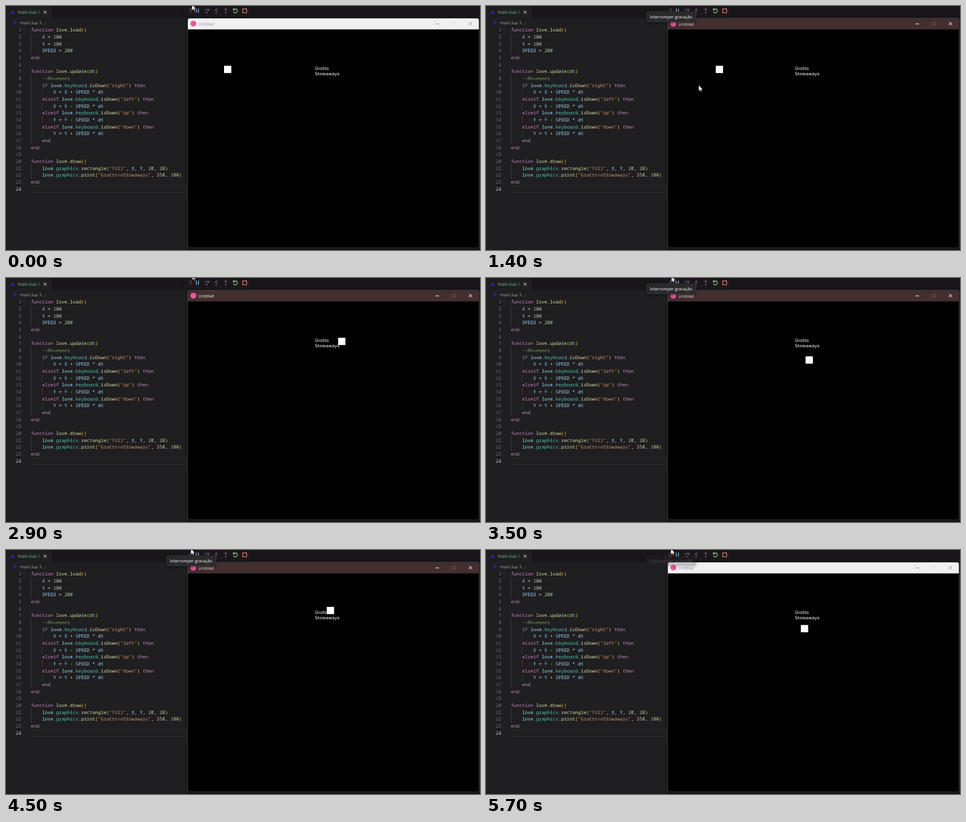
Animation of 800 by 412 pixels, one loop 5.8 s. Source, as an HTML page:

```html
<!DOCTYPE html>
<html lang="en">
<head>
<meta charset="utf-8">
<title>Editor and game window</title>
<style>
  html, body { margin: 0; width: 100%; height: 100%; overflow: hidden; background: #1f1e20; }
  svg { display: block; width: 800px; height: 412px; }
  text { white-space: pre; text-rendering: geometricPrecision; }
  .ui { font-family: "Open Sans", "Noto Sans", sans-serif; }
  .code { font: 7.87px "Noto Sans Mono", "DejaVu Sans Mono", monospace; }
  .game { font: 7.4px "DejaVu Sans", sans-serif; fill: #fff; }
  .icon { fill: none; stroke-width: 1; }
</style>
</head>
<body>
<svg viewBox="0 0 800 412">
  <defs>
    <filter id="shadow" x="-20%" y="-60%" width="140%" height="260%">
      <feDropShadow dx="0" dy="1.5" stdDeviation="2" flood-color="#000" flood-opacity=".5"/>
    </filter>
  </defs>

  <rect width="800" height="412" fill="#1f1e20"/>
  <rect x="75" width="725" height="20" fill="#19161a"/>
  <rect x="306" y="408" width="494" height="4" fill="#19161a"/>
  <path d="M75.5 0V20" stroke="#2a282b"/>

  <g class="ui">
    <circle cx="11.5" cy="10.8" r="2.8" fill="#24269a"/>
    <text x="20" y="13.4" font-size="7.5" fill="#73c991">main.lua</text>
    <text x="52.3" y="13.2" font-size="7" fill="#4f8d68">U</text>
    <path class="icon" d="M63.5 8l5 5m0-5l-5 5" stroke="#e4e4e4"/>
    <circle cx="15" cy="28" r="2.8" fill="#24269a"/>
    <text x="23.8" y="30.8" font-size="7.3" fill="#a9a9a9">main.lua</text>
    <path class="icon" d="M57 25.8l2.3 2.3-2.3 2.3" stroke="#a9a9a9" stroke-width=".8"/>
    <text x="62.8" y="30.8" font-size="7.3" fill="#a9a9a9">...</text>
  </g>

  <path d="M42 303.5H306M42 314.5H306" stroke="#2b2a2c"/>
  <path id="guides" class="icon" stroke="#3d3c3e" stroke-width=".7"/>
  <g id="code" class="code"></g>

  <g filter="url(#shadow)">
    <rect x="302" y="-4" width="110" height="21" rx="2" fill="#1a181a" stroke="#2c2a2c" stroke-width=".6"/>
  </g>
  <path d="M309.8 4.8v7M312.8 4.8v7" stroke="#8a8a8a" stroke-width="1.2" stroke-dasharray="1.2 1.6"/>
  <g class="icon">
    <path d="M321.2 4.5v7M324.8 4.5v7" stroke="#75beff" stroke-width="1.3"/>
    <g stroke="#6d7276">
      <path d="M335.2 8.5a3.8 3.8 0 0 1 7-1.3M342.6 4.2v3.2h-3.2"/>
      <path d="M354.8 3.5v5M352.4 6.4l2.4 2.4 2.4-2.4"/>
      <path d="M370.8 9.5v-5.5M368.4 6.4l2.4-2.4 2.4 2.4"/>
      <g fill="#6d7276" stroke="none">
        <circle cx="339" cy="11" r="1.2"/><circle cx="354.8" cy="11.6" r="1.2"/><circle cx="370.8" cy="11.6" r="1.2"/>
      </g>
    </g>
    <path d="M384.2 6.3a3.4 3.4 0 1 1-.5 2.8M383.7 3.8v2.8h2.8" stroke="#89d185" stroke-width="1.2"/>
    <rect x="399.5" y="4.8" width="6.6" height="6.6" stroke="#f48771" stroke-width="1.1"/>
  </g>

  <g filter="url(#shadow)">
    <rect x="306.5" y="20.5" width="492" height="388" rx="3.5" fill="#000" stroke="#3b3839"/>
  </g>
  <path id="bar" d="M307 39.5V24q0-3 3-3H795q3 0 3 3V39.5z"/>
  <circle cx="316.3" cy="29.8" r="4.9" fill="#e85a9b"/>
  <text id="title" class="ui" x="324.8" y="32.6" font-size="7">Untitled</text>
  <g class="icon">
    <path id="buttons" d="M725 30.2h6M781.2 27.2l5.4 5.4m0-5.4l-5.4 5.4"/>
    <rect id="maximize" x="753.3" y="27.3" width="5.2" height="5.2" rx=".6" stroke-width=".8"/>
  </g>

  <text class="game" x="521.3" y="108.2">Grotto</text>
  <text class="game" x="521.3" y="116.9">Stowaways</text>
  <rect id="player" width="12.3" height="12.3" fill="#fff"/>

  <g id="tooltip" class="ui" filter="url(#shadow)">
    <rect x="271.3" y="9.5" width="83.4" height="17.5" rx="2.5" fill="#2c2b2c" stroke="#3a393a" stroke-width=".6"/>
    <text x="276.6" y="21" font-size="7.05" fill="#fff">Interromper gravação</text>
  </g>
  <path id="cursor" d="M0 0V9.8L2.3 7.7 3.8 11 5.4 10.3 3.9 7.1H6.9z" fill="#fff" stroke="#111" stroke-width=".5"/>
</svg>

<script>
const LOOP = 5800, STEP = 100;
const LINE = 11.67, CODE_X = 42, CODE_Y = 43.2, INDENT = 18.9;
const $ = id => document.getElementById(id);

const source = String.raw`function love.load()
    X = 100
    Y = 100
    SPEED = 200
end

function love.update(dt)
    --Movement
    if love.keyboard.isDown("right") then
        X = X + SPEED * dt
    elseif love.keyboard.isDown("left") then
        X = X - SPEED * dt
    elseif love.keyboard.isDown("up") then
        Y = Y - SPEED * dt
    elseif love.keyboard.isDown("down") then
        Y = Y + SPEED * dt
    end
end

function love.draw()
    love.graphics.rectangle("fill", X, Y, 20, 20)
    love.graphics.print("Grotto\nStowaways", 350, 100)
end
`.split("\n");

const rules = [
  [/^--.*/, "#6a9955"],
  [/^"[^"]*"/, "#ce9178"],
  [/^\\n/, "#d7ba7d"],
  [/^(function|end|if|elseif|then)\b/, "#c586c0"],
  [/^\d+/, "#b5cea8"],
  [/^[()]/, "#ffd700"],
  [/^love\.\w+(?=\()/, "#dcdcaa"],
  [/^\w+(?=\()/, "#dcdcaa"],
  [/^(keyboard|graphics)\b/, "#4ec9b0"],
  [/^\w+/, "#9cdcfe"],
  [/^[^\w"()-]+|^-/, "#d4d4d4"]
];

function svgNode(parent, tag, attrs, content) {
  const node = document.createElementNS("http://www.w3.org/2000/svg", tag);
  for (const key in attrs) node.setAttribute(key, attrs[key]);
  if (content) node.textContent = content;
  return parent.appendChild(node);
}

function highlight(line, parent) {
  while (line) {
    for (const [pattern, fill] of rules) {
      const match = line.match(pattern);
      if (!match) continue;
      svgNode(parent, "tspan", { fill }, match[0]);
      line = line.slice(match[0].length);
      break;
    }
  }
}

let guides = "";
source.forEach((line, i) => {
  const y = CODE_Y + i * LINE;
  const fill = i === source.length - 1 ? "#d0d0d0" : "#6e7681";
  svgNode($("code"), "text", { x: 26, y, fill, "text-anchor": "end" }, String(i + 1));
  highlight(line, svgNode($("code"), "text", { x: CODE_X, y }));
  const depth = line.search(/\S/) / 4;
  for (let d = 0; d < depth; d++) guides += `M${CODE_X + .3 + d * INDENT} ${y - 8.5}v${LINE}`;
});
$("guides").setAttribute("d", guides);

// Each key is [time, ...values]
const playerPath = [
  [1240, 368, 100.9], [1400, 387.8, 100.9], [2200, 478, 100.9], [2980, 570, 100.9],
  [3245, 570, 132.3], [3500, 539.4, 132.3], [3845, 498, 132.3], [4145, 498, 96],
  [4500, 541.4, 96], [4830, 581, 96], [5080, 581, 126.6], [5485, 531.4, 126.6]
];
const cursorPath = [
  [600, 313.8, -2.5], [700, 314, 5], [850, 314, 5], [1200, 359, 133.8],
  [1700, 359, 133.8], [2100, 325, -14], [2700, 316, -14], [3000, 313, -3],
  [3600, 313, -3], [3700, 312, -2.2]
];
const tooltipFade = [[300, 0], [500, 1], [1500, 1], [1700, 0], [3100, 0], [3300, 1], [5600, 1], [5730, 0]];

function sample(keys, t) {
  if (t <= keys[0][0]) return keys[0].slice(1);
  const i = keys.findIndex(key => key[0] > t);
  if (i < 0) return keys[keys.length - 1].slice(1);
  const a = keys[i - 1], b = keys[i], k = (t - a[0]) / (b[0] - a[0]);
  return a.slice(1).map((v, j) => v + (b[j + 1] - v) * k);
}

function place(id, [x, y]) {
  $(id).setAttribute("transform", `translate(${x} ${y})`);
}

function render(t) {
  const focused = t >= 1200 && t < 5600;
  $("bar").setAttribute("fill", focused ? "#432e30" : "#f1f0f1");
  $("title").setAttribute("fill", focused ? "#fff" : "#929292");
  $("buttons").setAttribute("stroke", focused ? "#fff" : "#919191");
  $("maximize").setAttribute("stroke", focused ? "#756466" : "#dfdedf");
  place("player", sample(playerPath, t));
  place("cursor", sample(cursorPath, t));
  $("tooltip").setAttribute("opacity", sample(tooltipFade, t)[0]);
}

const start = performance.now();
function tick() {
  const t = (performance.now() - start) % LOOP;
  render(Math.floor(t / STEP) * STEP);
  requestAnimationFrame(tick);
}
tick();
</script>
</body>
</html>
```
